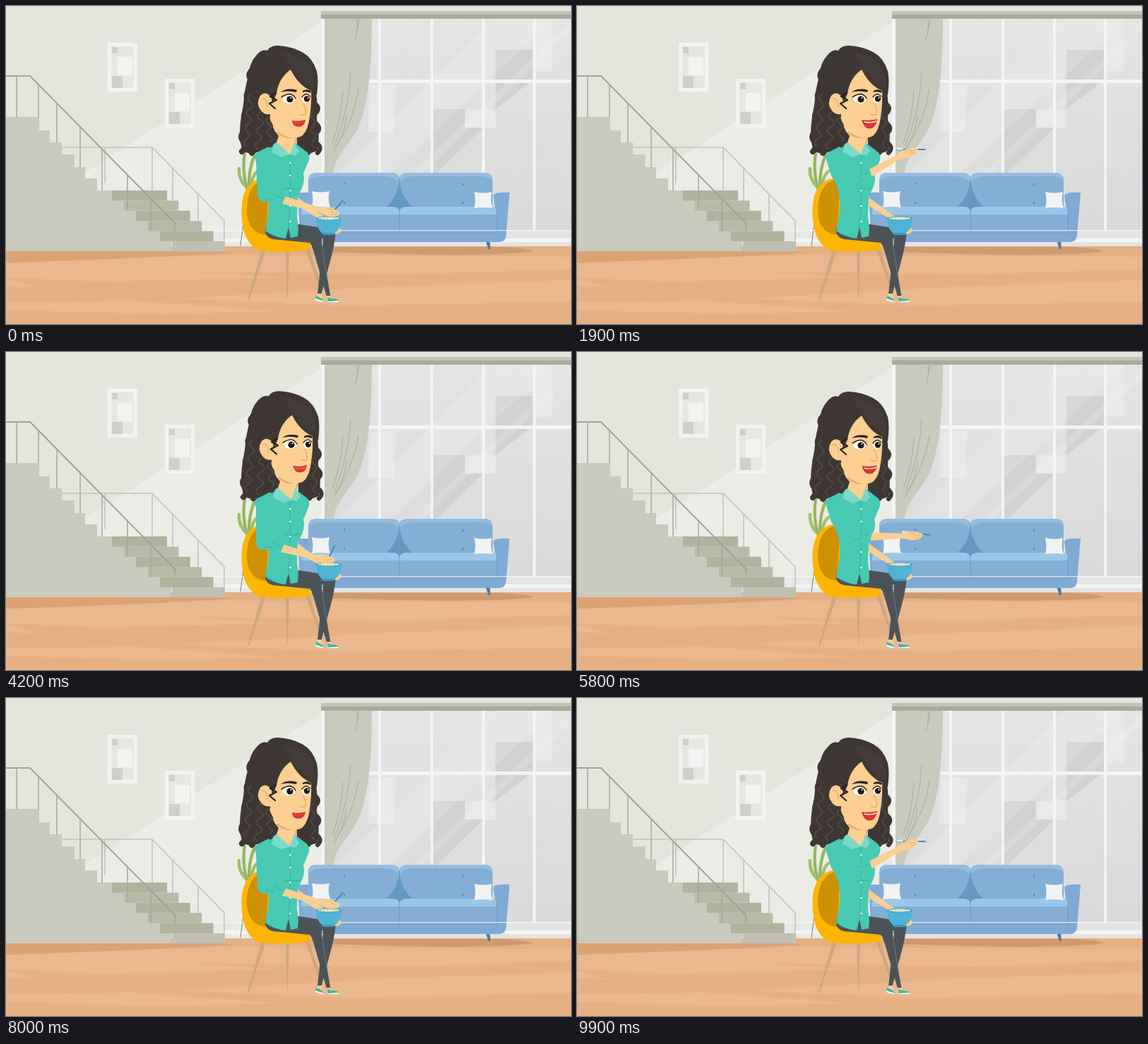
Write an HTML page that moves like this. It is 800 by 450 pixels and loops after 10000 ms.

```html
<!DOCTYPE html>
<html lang="en">
<head>
<meta charset="utf-8">
<title>Breakfast</title>
<style>
html, body { margin: 0; width: 100%; height: 100%; overflow: hidden; background: #e4e5dd; }
svg { display: block; width: 100vw; height: 100vh; }
.line { fill: none; stroke-linecap: round; stroke-linejoin: round; }
</style>
</head>
<body>
<svg viewBox="0 0 800 450">
<defs>
  <linearGradient id="glass" x1="0" y1="0" x2="0" y2="1">
    <stop offset="0" stop-color="#e4e4e4"/><stop offset="1" stop-color="#dadadb"/>
  </linearGradient>
  <g id="picture">
    <path fill="#f2f3f0" d="M0 0H42V69H0Z"/>
    <path fill="#e6e7e1" d="M5 5H37V64H5Z"/>
    <path fill="#cfd0c8" d="M6 6h8v9h-8ZM6 47h15v17h-15Z"/>
    <path fill="#f2f3f0" d="M14 20h21v26h-21Z"/>
  </g>
  <path id="pillow" fill="#f1f2f2" d="M0 0Q13 3 25 0Q22 12 26 23Q13 21 0 23Q3 12 0 0Z"/>
</defs>

<!-- room -->
<path fill="#e4e5dd" d="M0 0H800V345H0Z"/>
<path fill="#ebece6" d="M447 22L90 250V345H447Z"/>
<use href="#picture" x="144" y="52"/>
<use href="#picture" x="225" y="103"/>

<!-- window -->
<path fill="url(#glass)" d="M446 18H800V335H446Z"/>
<path fill="#d2d2d2" d="M693 62H747V104L693 146ZM603 146H650V172H676L610 236H603Z"/>
<path fill="#e8e8e8" d="M515 112H553L549 178H513ZM650 146H693V172H650ZM750 18H774V92H750Z"/>
<path fill="#fff" opacity=".14" d="M690 18H775L545 236H470ZM800 22V36L590 236H575Z"/>
<path fill="#f3f4f4" d="M446 18h5V335h-5ZM527 18h4V335h-4ZM601 18h4V335h-4ZM674 18h4V335h-4ZM746 18h4V335h-4ZM451 104H800v5H451Z"/>
<path fill="#e8e9e5" d="M294 318H451V340H294Z"/>
<path fill="#e4e4e3" d="M451 318H800V340H451Z"/>
<path fill="#f4f5f3" d="M294 317H800v1.5H294ZM309 329H800v5H309Z"/>
<path fill="#c9cabe" d="M451 18H518C518 90 513 145 496 177C483 201 466 211 463 240V318H451Z"/>
<g class="line" stroke="#a9aa9b" stroke-width="1">
  <path d="M497 20Q499 33 494 47M500 18L497 35M488 95Q486 145 465 198M499 118Q493 160 467 200M477 120Q475 160 462 194M482 155Q480 180 464 206"/>
</g>
<path fill="#a9aa9b" d="M446 8H800V18H446Z"/>
<path fill="#c3c4b7" d="M446 7H800V12H446Z"/>

<!-- floor -->
<path fill="#e5b083" d="M0 340H800V450H0Z"/>
<path fill="#eab88f" d="M0 364L310 352L800 355V372L560 380L250 375L395 384L130 390L0 384ZM0 386L45 398L0 397ZM240 414L520 398L800 388V418L480 424ZM0 419L180 417L390 432L220 436L0 430Z"/>
<path fill="#dba274" d="M0 347H309L322 349Q190 357 0 363Z"/>
<path fill="#cf9a6f" d="M440 341H700Q742 343 746 347Q700 354 560 351L440 348Z"/>

<!-- stairs -->
<path class="line" stroke="#c2c3ba" stroke-width="1.6" d="M80 200H207L309 304V333M207 200V262M236 230V276M272 266V304M140 200V250"/>
<path fill="#c9cabd" d="M0 157H47V176H62V193H79V210H97V228H112V244H129V261H150V275H167V289H184V303H201V318H218V333H234V347H0Z"/>
<g id="steps"></g>
<path class="line" stroke="#a0a197" stroke-width="1.9" d="M0 99H34L240 308"/>
<path class="line" stroke="#a4a598" stroke-width="1.4" d="M15 99V157M46 111V157M72 138V193M105 171V228M136 203V261M172 240V289M205 273V318M239 308V318"/>

<!-- plant -->
<g class="line" stroke="#9fbe6c" stroke-width="4.500">
  <path d="M341 258Q334 232 338 208M344 258Q343 232 352 211M340 256Q329 245 330 230M347 256Q348 240 356 234"/>
  <path stroke="#85a658" stroke-width="1" d="M341 258Q334 232 338 210M344 258Q343 232 352 212"/>
</g>
<path class="line" stroke="#85796b" stroke-width="1" d="M337 300L332 339M347 300L350 339"/>

<!-- sofa -->
<path fill="#53789c" d="M679 332H685L686 344H683ZM437 332H443L440 344H437Z"/>
<path fill="#7faad4" d="M413 264H432V290H693L690 268Q692 263 713 264L708 325Q707 334 698 334H425Q416 334 416 322Z"/>
<path fill="#85aed5" d="M428 247Q428 236 440 236H545Q555 236 557 243Q559 236 570 236H678Q689 236 689 248V292H428Z"/>
<path fill="#94bde2" d="M440 236H545Q555 236 557 243Q559 236 570 236H678Q687 236 689 246Q680 240 665 241H580Q565 240 557 250Q548 240 530 241H452Q436 240 428 247Q428 236 440 236Z"/>
<path fill="#6598bf" d="M557 243Q558 268 575 284Q566 293 557 293Q548 293 539 284Q556 268 557 243Z"/>
<path fill="#85aed5" d="M418 292H695V322H425Q418 322 418 310Z"/>
<path fill="#99c7e9" d="M418 290Q418 284 428 284H548Q556 284 557 291Q558 284 567 284H688Q695 284 695 291V295H418Z"/>
<path class="line" stroke="#6b9bc6" d="M420 321H695V290M557 245V321"/>
<path fill="#5d8db6" d="M478 250h2v3h-2ZM478 277h2v3h-2ZM646 251h2v3h-2ZM646 277h2v3h-2Z"/>
<use href="#pillow" x="433" y="262"/>
<use href="#pillow" x="663" y="263"/>
<path fill="#f4f5f3" opacity=".8" d="M309 317H800v1.2H309Z"/>

<!-- chair -->
<path fill="#cba880" d="M362 345H368L344 416H342ZM396 346H401L399 413H398ZM424 345H430L444 392L442 394Z"/>
<path fill="#ffb400" d="M372 244C350 241 334 257 333.500 287C333 322 343 340 360 346Q395 350 430 345L432 333L372 320Z"/>
<path fill="#cc9000" d="M373 246C354 244 341 260 341 290C342 312 352 322 368 324Z"/>

<!-- woman -->
<g class="sway">
  <path fill="#3f3734" d="M410 80L434 100Q443 130 440 160Q445 185 441 204Q430 212 412 204Z"/>
  <g class="line" stroke="#3f3734" stroke-width="6" id="backCurls"></g>
</g>
<path fill="#fdcf92" d="M412 270L450 298L446 303L410 281Z"/>
<path fill="#4b5358" d="M367 315Q366 327 378 330L430 335Q440 334 450 328L467 322Q466 315 455 315L415 309H370Z"/>
<path fill="#4b5358" d="M429 333L446 326L451 362L459.500 411H454L437 352Q434 340 429 333Z"/>
<path fill="#4b5358" d="M450 322L467 319Q465 340 459 361L446.500 408H441L446 362Z"/>
<path class="line" stroke="#788086" stroke-width=".8" d="M447 335L451 362L455 385"/>
<path fill="#fdcf92" d="M441 407H447L448 413H441ZM454 410H459L462 415H455Z"/>
<path fill="#fff" d="M438 413L451 418Q447 420 438 416ZM455 417H471V419H456Z"/>
<path fill="#35b8a5" d="M439 410L444 412L451 418L438 414ZM455 412L461 414Q469 414 471 417L456 418Z"/>
<path fill="#47c9b2" d="M352 214Q353 206 365 202L381 192H407L424 205Q431 210 429 218L421 237Q425 252 413 268L412 298Q415 312 413 326L403 328L400 313L396 329Q378 327 367 318Q373 292 372 275Q371 255 360 240Z"/>
<path class="line" stroke="#33ad99" stroke-width=".9" d="M402 212Q404 270 400 313M393 258Q405 261 417 257M406 205L408 212"/>
<g id="buttons" fill="#e9fbf7"></g>

<g class="sway">
  <path fill="#e3ae70" d="M385 160H412V190L403 210L382 196Z"/>
  <path fill="#fdcf92" d="M384 180Q395 190 410 186L408 196L402 210L383 194Z"/>
  <path fill="#7bd9c7" d="M381 191L402 210L390 214L376 207ZM408 193L402 210L410 212L415 205Z"/>
  <path fill="#fdcf92" d="M400 84L370 110L366 160Q377 175 392 182Q408 191 420 183Q428 175 430 157Q433 140 432 116Z"/>
  <path fill="#3f3734" d="M403 90Q386 102 383 124L372 150Q375 172 386 184L383 193Q370 200 358 206Q345 212 335 204C328 185 332 160 336 140Q338 115 343 100Q344 80 356 68Q363 61 370 63Q374 56 385 56Q404 57 419 65Q434 73 440 92Q443 105 440 126L432 120Q414 112 403 90Z"/>
  <path fill="#4a413d" d="M388 66Q418 66 433 88Q438 103 436 117Q416 107 405 86Q397 74 388 66Z" opacity=".55"/>
  <g class="line" stroke="#3f3734" stroke-width="8" id="curls"></g>
  <g class="line" stroke="#564b45" stroke-width="1.6" id="shine"></g>
  <path fill="#fdcf92" d="M376 129Q367 119 360 127Q353 138 361 148Q367 156 378 152Z"/>
  <path class="line" stroke="#dca767" stroke-width="1.2" d="M362 131Q370 130 370 143M421 138Q426 150 424 153Q420 156 416 153"/>
  <path class="line" stroke="#29201e" stroke-width="2.200" d="M382 123L374 128L383 133L373 138L381 145"/>
  <path fill="#fff" d="M391 131Q395 126 402 125.500Q408 127 410 133Q406 138 400 138Q393 137 391 131ZM419 131Q421 125.500 426 125.500Q430 127 431 133Q429 137.500 424 137.500Q420 137 419 131Z"/>
  <circle cx="402" cy="132" r="4.600" fill="#24150f"/><circle cx="426" cy="131.500" r="4.200" fill="#24150f"/>
  <circle cx="403.500" cy="130" r="1" fill="#fff"/><circle cx="427.500" cy="130" r="1" fill="#fff"/>
  <path class="line" stroke="#29201e" stroke-width="1.300" d="M390 129Q395 125 402 124.500Q408 126 410 131M419 129Q422 125 426 124.500L431 128"/>
  <path fill="#29201e" d="M389 122Q398 115 412 119L411 122Q399 119 389 122ZM420 120Q427 116 432 121L431 123Q426 120 420 122Z"/>
  <path id="lips" fill="#d9382f"/>
  <path id="teeth" class="line" stroke="#fff" stroke-width="1.400" stroke-dasharray="1.600 1"/>
</g>

<!-- spoon, bowl, arm -->
<g id="spoon">
  <path class="line" stroke="#3b8fa5" stroke-width="2" d="M-18 0H19"/>
  <ellipse cx="-17" cy=".5" rx="5.500" ry="2" fill="#7fc4d6"/>
  <path id="bite" class="line" stroke="#f4efcf" stroke-width="2.400" stroke-dasharray="2 2" d="M-20 -1H-13"/>
</g>
<path fill="#fdcf92" d="M466 313Q474 312 475 318Q472 324 464 322Z"/>
<path fill="#4fb3d5" d="M439 300H475Q475 315 466 321L464 324H449L447 321Q439 314 439 300Z"/>
<path fill="#3b9cc0" d="M448 321H466L464 324H449Z"/>
<ellipse cx="457" cy="300.500" rx="18" ry="2.800" fill="#3b9cc0"/>
<ellipse cx="457" cy="300.500" rx="15.500" ry="1.900" fill="#f3edcb"/>
<path class="line" stroke="#c9a95c" stroke-width="1" stroke-dasharray="1 4" d="M445 300.500H470"/>
<path id="forearm" fill="#fdcf92"/>
<path id="sleeve" class="line" stroke="#47c9b2" stroke-width="20"/>
<path id="cuff" fill="#47c9b2"/>
<path id="crease" class="line" stroke="#33ad99" stroke-width=".8"/>
<g id="hand">
  <path fill="#fdcf92" d="M-3 -3.500Q8 -7 15 -6L24 -4Q28 -2 26 1L23 4Q17 7 8 6L-3 3.500Z"/>
  <path class="line" stroke="#e3ae70" stroke-width=".8" d="M14 -1L23 -1M15 3L22 2M7 -3Q11 -5 16 -4"/>
</g>
</svg>

<script>
const $ = id => document.getElementById(id);
const set = (id, name, value) => $(id).setAttribute(name, value);
const fill = (id, list, draw) => { $(id).innerHTML = list.map(draw).join(""); };

fill("steps", [0, 1, 2, 3, 4, 5], i =>
  `<path fill="${i > 4 ? "#c0c1b3" : i % 2 ? "#b9baa8" : "#b2b39f"}" d="M${150 + 17 * i} ${261 + 14.4 * i}h${78 - i * .6}v14.400h-${78 - i * .6}Z"/>`);
fill("buttons", [222, 240, 261, 283, 305], y => `<circle cx="402.500" cy="${y}" r="1.300"/>`);

// a wavy strand between two points
function strand([x1, y1, x2, y2, n = 6, amp = 5]) {
  let d = `M${x1} ${y1}`;
  for (let i = 1; i <= n; i++) {
    const mid = (i - .5) / n, side = i % 2 ? -amp : amp;
    d += `Q${x1 + (x2 - x1) * mid + side} ${y1 + (y2 - y1) * mid} ${x1 + (x2 - x1) * i / n} ${y1 + (y2 - y1) * i / n}`;
  }
  return `<path d="${d}"/>`;
}
fill("backCurls", [[437, 124, 441, 208, 6, 8], [432, 150, 428, 208, 4, 7]], strand);
fill("curls", [[349, 90, 334, 206, 8, 7], [346, 130, 348, 208, 6, 7], [370, 155, 374, 196, 4]], strand);
fill("shine", [[347, 125, 340, 198, 7, 8], [361, 150, 356, 202, 5, 9], [371, 158, 374, 192, 4, 7], [434, 150, 436, 200, 5, 6]], strand);

// time, elbow x y, wrist x y, hand angle, spoon angle, mouth opening, food, head shift
const rest = [366, 267, 446, 289, 12, -48, .1, 0, 0];
const dip = [364, 270, 439, 291, 10, -65, .25, 0, 2];
const sip = [396, 241, 437, 180, -48, -11, .35, 0, 0];
const keys = [
  [0, ...rest], [200, ...dip], [600, ...rest], [1000, ...dip], [1400, ...rest], [1650, ...rest],
  [1800, 388, 262, 463, 260, 0, 5, .7, 1, 0],
  [1900, 391, 250, 458, 212, -20, 0, 1, 1, 0],
  [2050, 398, 242, 451, 180, -42, -6, 1, 1, 0],
  [2200, ...sip], [2600, ...sip],
  [2800, 399, 240, 450, 178, -48, -14, .3, 0, 0],
  [3050, 391, 251, 461, 222, -18, -5, .15, 0, 0],
  [3350, ...rest], [3600, ...dip], [4000, ...rest]
];

function poseAt(t) {
  const i = keys.findIndex(k => k[0] > t), a = keys[i - 1], b = keys[i];
  const p = (t - a[0]) / (b[0] - a[0]), e = p * p * (3 - 2 * p);
  return a.map((v, j) => v + (b[j] - v) * e);
}

function draw(now) {
  const t = Math.floor(now % 10000 / 100) * 100;
  const [, ex, ey, wx, wy, turn, tilt, open, food, lean] = poseAt(t % 4000);
  const len = Math.hypot(wx - ex, wy - ey), ux = (wx - ex) / len, uy = (wy - ey) / len;
  const at = (along, side) => `${ex + ux * along - uy * side} ${ey + uy * along + ux * side}`;

  set("forearm", "d", `M${at(20, -6)}L${at(len, -3.5)}L${at(len, 3.5)}L${at(20, 6)}Z`);
  set("sleeve", "d", `M364 218L${ex} ${ey}`);
  set("cuff", "d", `M${at(-6, -9)}L${at(30, -7)}L${at(27, 7)}L${at(-3, 9)}Z`);
  set("crease", "d", `M${at(12, -4)}L${at(25, -2)}M${at(14, 3)}L${at(3, 5)}`);
  set("hand", "transform", `translate(${wx} ${wy}) rotate(${turn})`);
  set("spoon", "transform", `translate(${wx} ${wy}) rotate(${turn}) translate(18 -3) rotate(${tilt - turn})`);
  set("bite", "opacity", food);

  const low = 170.5 + open * 3, left = 405 - open * 2, top = 162 - open;
  set("lips", "d", `M${left} ${top}Q415 ${164 - open} ${424 + open} ${161 - open}Q423 ${low} 414 ${low}Q406 ${low} ${left} ${top}Z`);
  set("teeth", "d", `M407 ${165 - open}Q415 ${167 - open} 423 ${164 - open}`);
  set("teeth", "opacity", Math.min(1, open * 1.2));
  for (const g of document.querySelectorAll(".sway"))
    g.setAttribute("transform", `translate(${lean} ${-lean / 3})`);
}

const start = performance.now();
(function loop() {
  draw(performance.now() - start);
  requestAnimationFrame(loop);
})();
</script>
</body>
</html>
```
